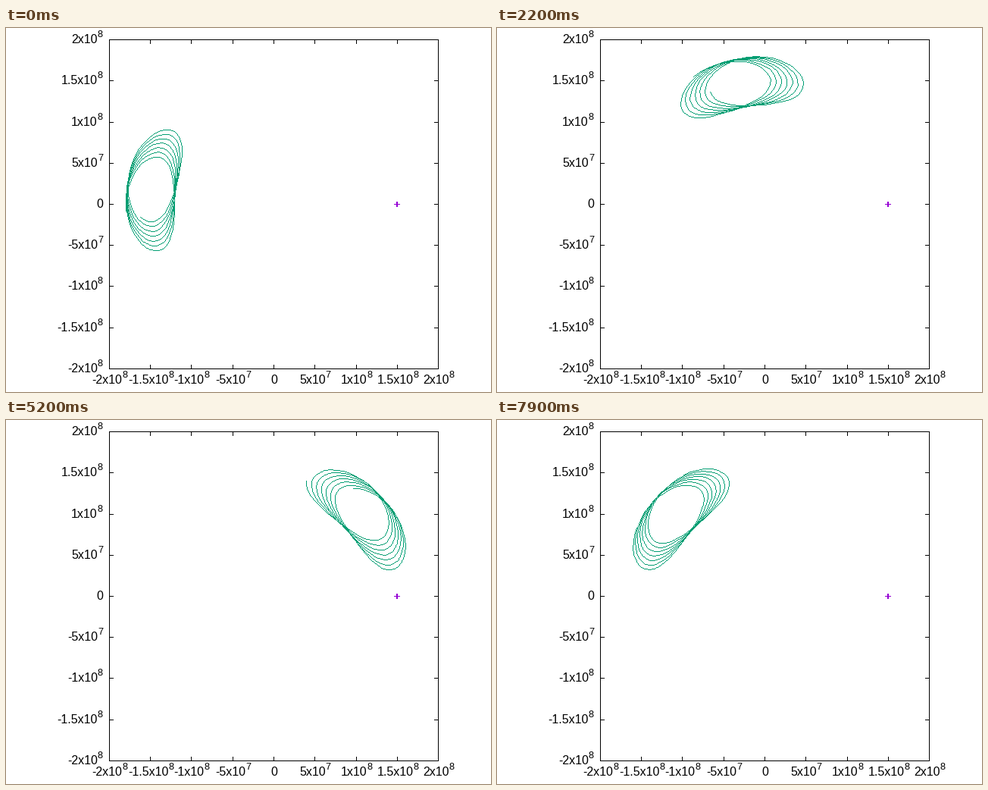
Recreate the animation shown at these times as a matplotlib script. Size 640 by 480 pixels, loop 8000 ms.

```python
import numpy as np
import matplotlib.pyplot as plt
from matplotlib.animation import FuncAnimation

plt.rcParams["font.family"] = "Liberation Sans"

W, H, DPI = 640, 480, 100
PX = 72 / DPI                      # one pixel in points
LEFT, RIGHT, TOP, BOTTOM = 136, 570, 15, 449
CX, CY = 353, 232                  # plot origin
STEP = (RIGHT - LEFT) / 8          # pixels between ticks
TICK = 5
BLACK, VIOLET, GREEN = (0, 0, 0), (148, 0, 211), (0, 158, 115)

FRAMES = 80
TRAIL = 5                          # trail length, in frames
YEARS = 1.3697                     # years per frame
PHASE = -0.169                     # orbital phase at the start
RADIUS, ECC = 162.3, 0.1965        # mean orbit radius in pixels
TURN = 42.7                        # time of closest approach

fig = plt.figure(figsize=(W / DPI, H / DPI), dpi=DPI, facecolor="white")
ax = fig.add_axes([0, 0, 1, 1])
ax.axis("off")


def polyline(canvas, xs, ys, color):
    """Hard-edged line, one pixel wide."""
    xs, ys = np.rint(xs).astype(int), np.rint(ys).astype(int)
    for x0, y0, x1, y1 in zip(xs[:-1], ys[:-1], xs[1:], ys[1:]):
        n = max(abs(x1 - x0), abs(y1 - y0)) + 1
        px = np.rint(np.linspace(x0, x1, n)).astype(int)
        py = np.rint(np.linspace(y0, y1, n)).astype(int)
        canvas[py, px] = color


def segment(x0, y0, x1, y1, color=BLACK):
    polyline(backdrop, [x0, x1], [y0, y1], color)


def text_width(s, size):
    advance = {"-": .333, ".": .278, "x": .5}
    return size * sum(advance.get(c, .556) for c in s)


def label(value, x, y, align):
    """Tick label with a raised exponent; y is the baseline."""
    if value == 0:
        base, power = "0", ""
    elif abs(value) == 0.5:
        base, power = f"{value * 10:g}x10", "7"
    else:
        base, power = f"{value:g}x10", "8"
    base_w = text_width(base, 16)
    total = base_w + text_width(power, 12.8)
    x -= total * align
    ax.text(x, y, base, size=16 * PX, va="baseline")
    ax.text(x + base_w, y - 8, power, size=12.8 * PX, va="baseline")


def draw_plot_frame():
    for y in (TOP, BOTTOM):
        segment(LEFT, y, RIGHT, y)
    for x in (LEFT, RIGHT):
        segment(x, TOP, x, BOTTOM)
    for i in range(9):
        value = -2 + i / 2
        x, y = round(LEFT + i * STEP), round(BOTTOM - i * STEP)
        segment(x, BOTTOM, x, BOTTOM - TICK)
        segment(x, TOP, x, TOP + TICK)
        segment(LEFT, y, LEFT + TICK, y)
        segment(RIGHT, y, RIGHT - TICK, y)
        label(value, x + 1, 469, .5)
        label(value, 128, y + 5, 1)


def draw_planet():
    segment(512, CY, 519, CY, VIOLET)
    for x in (515, 516):
        segment(x, CY - 3, x, CY + 3, VIOLET)


def guide_angle(t):
    """Mean longitude relative to the planet, in degrees."""
    d = np.abs(t - TURN)
    slowing = 2.48 * np.log1p(np.exp((d - 25) / 4))
    return 16 + np.hypot(3.75 * d, 8) - slowing


def trail(t_head):
    """Horseshoe path in the frame that rotates with the planet."""
    t = np.linspace(t_head - TRAIL, t_head, 251)
    phi = guide_angle(t)
    mean = 2 * np.pi * (PHASE + YEARS * t + phi / 360)
    ecc_anom = mean
    for _ in range(6):
        ecc_anom = ecc_anom - (ecc_anom - ECC * np.sin(ecc_anom) - mean) / (
            1 - ECC * np.cos(ecc_anom))
    beta = ECC / (1 + np.sqrt(1 - ECC ** 2))
    true = ecc_anom + 2 * np.arctan2(beta * np.sin(ecc_anom),
                                     1 - beta * np.cos(ecc_anom))
    axis = RADIUS * (1 - np.gradient(phi, t) / (540 * YEARS))
    r = axis * (1 - ECC * np.cos(ecc_anom))
    theta = np.radians(phi) + true - mean
    return CX + r * np.cos(theta), CY - r * np.sin(theta)


backdrop = np.full((H, W, 3), 255, np.uint8)
draw_plot_frame()
draw_planet()
picture = ax.imshow(backdrop, extent=(0, W, H, 0), aspect="auto",
                    interpolation="nearest")


def update(i):
    canvas = backdrop.copy()
    polyline(canvas, *trail(i), GREEN)
    picture.set_data(canvas)
    return picture,


anim = FuncAnimation(fig, update, frames=FRAMES, interval=100,
                     init_func=lambda: update(0), repeat=True, repeat_delay=0)
plt.show()
```
